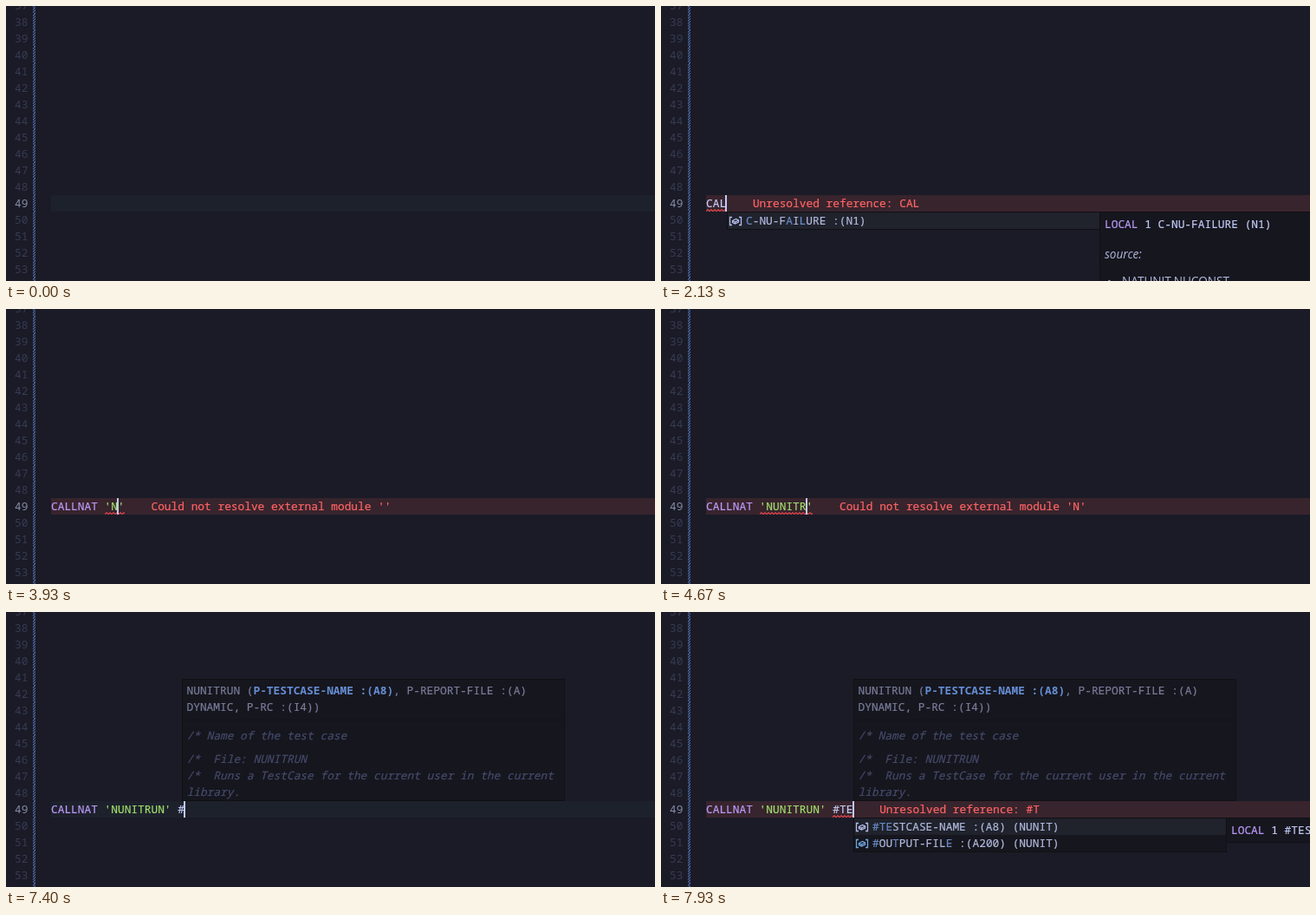
Recreate the animation shown at these times as an HTML page. Size 749 by 317 pixels, loop 8 s.

```html
<!DOCTYPE html>
<html lang="en">
<head>
<meta charset="utf-8">
<title>Editor completion</title>
<style>
  html, body { margin: 0; width: 100%; height: 100%; overflow: hidden; background: #1a1b26; }
  #stage { position: relative; width: 749px; height: 317px; overflow: hidden;
    font: 12.83px/19px "Noto Sans Mono", monospace; white-space: pre; color: #c0caf5;
    -webkit-text-stroke: .2px; }
  #stage div, #stage svg { position: absolute; box-sizing: border-box; }
  .changed { width: 3px; height: 19px; background: 0 0 / 3px 3px
    linear-gradient(-45deg, #455a90 25%, #1a1b26 25% 50%, #455a90 50% 75%, #1a1b26 75%); }
  .number { color: #363b54; -webkit-text-stroke: 0; }
  .number.active { color: #868ba9; }
  .line { width: 697px; height: 19px; background: #1d212c; }
  .line.error { background: #38242d; }
  .message { color: #ff6464; }
  .caret { width: 2px; height: 19px; background: #c0caf5; }
  .trailing { width: 7px; height: 19px; border-radius: 3px; background: rgba(255,0,0,.3);
    border: 1px solid rgba(255,100,100,.15); }
  .box { background: #16161e; border: 1px solid #101014; overflow: hidden; }
  .row { width: 100%; height: 19px; color: #b1b9dd; }
  .row.selected { background: #20222c; }
  .row div { left: 21px; }
  .hint { color: #787c99; }
  .hint b { color: #668fd6; -webkit-text-stroke: 0; }
  .comment { color: #444b6a; font-style: italic; }
  .sans { font: 13.6px/19px "Open Sans", sans-serif; color: #b1b9dd; -webkit-text-stroke: 0; }
  .keyword { color: #bb9af7; }
  .string { color: #9fdc6c; }
  .match { color: #668ac4; }
</style>
</head>
<body>
<div id="stage"></div>
<script>
const stage = document.getElementById('stage');
const LOOP = 8000, CHAR = 7.698, LEFT = 52, ROW = 19;
const columnX = n => LEFT + n * CHAR;
const lineY = n => 218 + (n - 49) * ROW;

const unresolved = name => 'Unresolved reference: ' + name;
const noModule = name => `Could not resolve external module '${name}'`;
const constants = ['C-NU-ASSERTION-ERROR :(N4)', 'C-NU-EMPTY :(N1)', 'C-NU-ERROR :(N1)',
  'C-NU-FAILURE :(N1)', 'C-NU-SUCCESS :(N1)'];
const variables = ['#TESTCASE-NAME :(A8) (NUNIT)', '#OUTPUT-FILE :(A200) (NUNIT)', '#RC :(I4) (NUNIT)'];
const call = "CALLNAT 'NUNITRUN'";

// Each entry changes part of the editor state from its time on.
const events = [
  [0, { line: 49, text: '', column: 0, caret: false }],
  [870, { line: 48, caret: true }],
  [1200, { line: 49 }],
  [1600, { text: 'C' }],
  [1670, { list: constants, query: 'C', wave: [0, 1] }],
  [1730, { message: unresolved('C') }],
  [1930, { text: 'CA', query: 'CA', list: [constants[0], constants[3]] }],
  [2000, { message: unresolved('CA'), wave: [0, 2] }],
  [2070, { text: 'CAL', query: 'CAL', list: [constants[3]] }],
  [2130, { message: unresolved('CAL'), wave: [0, 3] }],
  [2270, { text: 'CALL', list: null }],
  [2330, { message: unresolved('CALL'), wave: [0, 4] }],
  [2400, { text: 'CALLN' }],
  [2530, { text: 'CALLNA', message: unresolved('CALLN'), wave: [0, 5] }],
  [2600, { message: unresolved('CALLNA'), wave: [0, 6], bulb: true }],
  [2670, { text: 'CALLNAT', wave: null }],
  [2730, { message: '' }],
  [3200, { text: 'CALLNAT ' }],
  [3270, { bulb: false, trailing: 7 }],
  [3470, { text: "CALLNAT ''", column: 9, trailing: 0 }],
  [3670, { message: noModule(''), wave: [8, 10] }],
  [3930, { text: "CALLNAT 'N'", column: 10, wave: [8, 11] }],
  [4200, { text: "CALLNAT 'NU'", column: 11, wave: [8, 12] }],
  [4270, { text: "CALLNAT 'NUN'", column: 12, message: noModule('N'), wave: [8, 13] }],
  [4400, { text: "CALLNAT 'NUNI'", column: 13, wave: [8, 14] }],
  [4470, { text: "CALLNAT 'NUNIT'", column: 14, wave: [8, 15] }],
  [4670, { text: "CALLNAT 'NUNITR'", column: 15, wave: [8, 16] }],
  [4730, { text: "CALLNAT 'NUNITRU'", column: 16, wave: [8, 17] }],
  [4800, { text: call, column: 17, message: '', wave: null }],
  [5130, { column: 18 }],
  [5530, { text: call + ' ', column: 0, trailing: 18 }],
  [5870, { hint: true }],
  [6070, { caret: false }],
  [6530, { caret: true }],
  [7070, { caret: false }],
  [7400, { text: call + ' #', caret: true, trailing: 0, hintX: 203 }],
  [7470, { hintX: 0 }],
  [7530, { list: variables, query: '#' }],
  [7600, { message: unresolved('#'), wave: [19, 20] }],
  [7670, { text: call + ' #T', query: '#T', list: variables.slice(0, 2) }],
  [7800, { message: unresolved('#T'), wave: [19, 21] }],
  [7930, { text: call + ' #TE', query: '#TE', wave: [19, 22] }],
];

const div = (cls, x, y, html = '', style = '') =>
  `<div class="${cls}" style="left:${x}px;top:${y}px;${style}">${html}</div>`;

const highlight = text => text
  .replace(/'.*'/, '<span class=string>$&</span>')
  .replace(/^CALLNAT/, '<span class=keyword>$&</span>');

// Marks the query's letters in order, as a fuzzy match does.
function markMatches(text, query) {
  let next = 0;
  return [...text].map(c => c === query[next] ? (next++, `<span class=match>${c}</span>`) : c).join('');
}

const icon = color => `<svg style="left:1px;top:2px" width="16" height="16" fill="none" stroke="${color}" stroke-width="1.3">
  <path d="M4 3.5H1.5v9H4M12 3.5h2.5v9H12M4.5 7.5l4-2 3 1.5v2l-4 2-3-1.5zM4.5 7.5l3 1.5 4-2M7.5 9v2"/></svg>`;

function squiggle([from, to], y) {
  const width = (to - from) * CHAR;
  let path = 'M0 2.5';
  for (let x = 2, up = true; x < width + 2; x += 2, up = !up) path += `L${x} ${up ? 0.7 : 2.7}`;
  return `<svg style="left:${columnX(from)}px;top:${y + 16}px" width="${width}" height="3">
    <path d="${path}" fill="none" stroke="#e8484e" stroke-width="1.1"/></svg>`;
}

const bulb = `<svg style="left:55px;top:199px" width="12" height="16" fill="#e0af68">
  <path d="M5.5 1a4.5 4.5 0 0 0-2.5 8.2V14h5V9.2A4.5 4.5 0 0 0 5.5 1z"/>
  <path d="M4 11.5h3" stroke="#1a1b26"/></svg>`;

function hintBox(x) {
  return div('box hint', x, 77,
    div('', 4.5, 3, 'NUNITRUN (<b>P-TESTCASE-NAME :(A8)</b>, P-REPORT-FILE :(A)\nDYNAMIC, P-RC :(I4))') +
    div('', 0, 46, '', 'width:100%;height:1px;background:#13131a') +
    div('comment', 4.5, 55, '/* Name of the test case') +
    div('comment', 4.5, 82, '/*  File: NUNITRUN\n/*  Runs a TestCase for the current user in the current\nlibrary.'),
    'width:442px;height:141px');
}

function suggestions({ list, query }, x) {
  const rows = list.map((item, i) => div('row' + (i ? '' : ' selected'), 0, i * ROW,
    icon(i ? '#6fa8e0' : '#b4bce8') + `<div>${markMatches(item, query)}</div>`)).join('');
  const [name, type] = list[0].replace(' (NUNIT)', '').split(' :');
  const isConstant = name[0] === 'C';
  const details = div('', 5, 4, `<span class=keyword>LOCAL</span> 1 ${name} ${type}`) +
    (isConstant ? div('sans', 5, 38, '<i>source:</i>') + div('sans', 8, 69, '●', 'font-size:8px') +
      div('sans', 25, 69, 'NATUNIT.NUCONST') : '');
  return div('box', x, 237, rows, `width:431px;height:${list.length * ROW + 2}px`) +
    div('box', x + 430, 237, details, `width:400px;height:${isConstant ? 110 : 29}px`);
}

function render(s) {
  const y = lineY(s.line);
  const caretX = columnX(s.column || s.text.length);
  const popupX = Math.round(caretX + 0.8);
  let html = '';
  for (let n = 37; n <= 54; n++) {
    html += div('changed', 31, lineY(n));
    html += div(n === s.line ? 'number active' : 'number', 10, lineY(n), n);
  }
  html += div(s.message ? 'line error' : 'line', LEFT, y, highlight(s.text));
  if (s.message) html += div('message', columnX(s.text.length + 4), y, s.message);
  if (s.trailing) html += div('trailing', columnX(s.trailing), y);
  if (s.wave) html += squiggle(s.wave, y);
  if (s.bulb) html += bulb;
  if (s.hint) html += hintBox(s.hintX || popupX);
  if (s.list) html += suggestions(s, popupX);
  if (s.caret) html += div('caret', Math.max(LEFT, Math.round(caretX - 0.8)), y);
  stage.innerHTML = html;
}

let shown = 0;
function frame() {
  const time = performance.now() % LOOP;
  const past = events.filter(([at]) => at <= time);
  if (past.length !== shown) {
    shown = past.length;
    render(Object.assign({}, ...past.map(([, change]) => change)));
  }
  requestAnimationFrame(frame);
}
frame();
</script>
</body>
</html>
```
